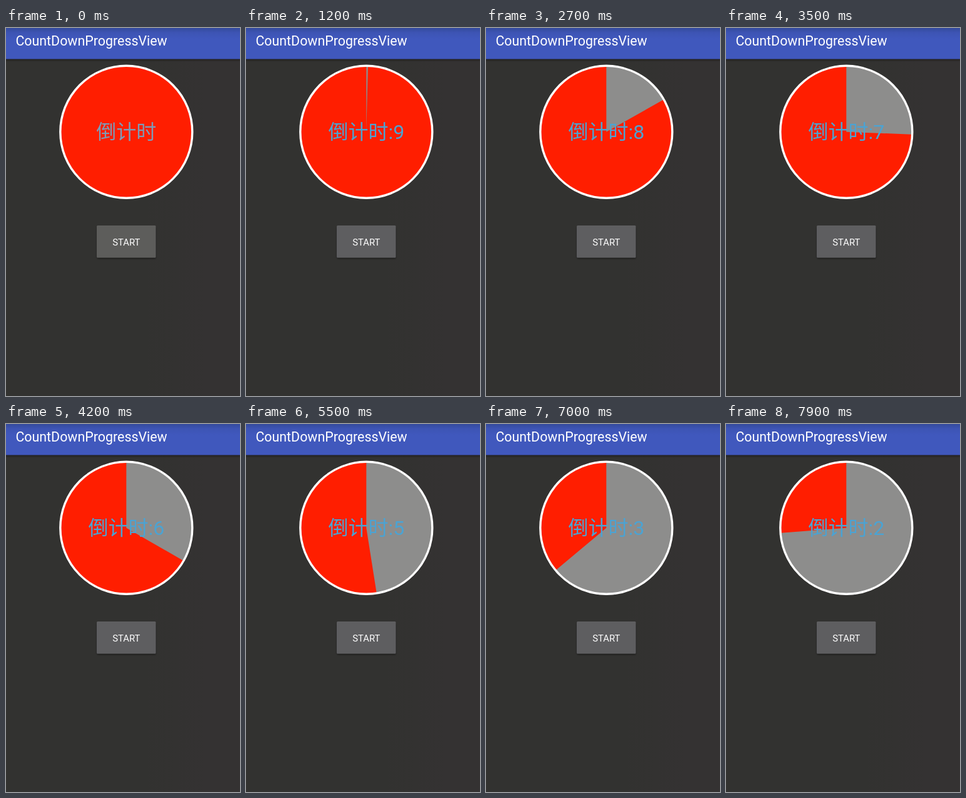
An HTML page for the animation above (8000 ms loop, 374x587 px).

```html
<!DOCTYPE html>
<html lang="zh-CN">
<head>
<meta charset="utf-8">
<title>CountDownProgressView</title>
<style>
  html, body {
    margin: 0;
    width: 100%;
    height: 100%;
    overflow: hidden;
    background: #323230;
  }
  svg { display: block; }
  text { font-family: Roboto, "Noto Sans CJK SC", "Noto Sans CJK", sans-serif; }
</style>
</head>
<body>
<svg width="374" height="587" viewBox="0 0 374 587">
  <defs>
    <linearGradient id="page">
      <stop offset=".6" stop-color="#323230"/>
      <stop offset=".85" stop-color="#343232"/>
    </linearGradient>
    <linearGradient id="bar" x2="0" y2="1">
      <stop offset="0" stop-color="#344a9c"/>
      <stop offset=".15" stop-color="#3d54b4"/>
      <stop offset=".35" stop-color="#4058bd"/>
      <stop offset="1" stop-color="#4058bd"/>
    </linearGradient>
    <linearGradient id="shade" x2="0" y2="1">
      <stop offset="0" stop-opacity=".4"/>
      <stop offset="1" stop-opacity="0"/>
    </linearGradient>
    <filter id="soft" x="-10%" y="-20%" width="120%" height="140%">
      <feGaussianBlur stdDeviation="1.3"/>
    </filter>
  </defs>

  <rect width="374" height="587" fill="url(#page)"/>
  <rect y="49" width="374" height="5" fill="url(#shade)"/>
  <rect width="374" height="49.5" fill="url(#bar)"/>
  <text x="15.4" y="28" font-size="21.4" fill="#fff">CountDownProgressView</text>

  <circle cx="192.3" cy="165.8" r="105.5" fill="#ff1e00"/>
  <path id="wedge" fill="#8d8d8c"/>
  <circle cx="192.3" cy="165.8" r="105.5" fill="none" stroke="#fff" stroke-width="3.4"/>
  <text id="label" x="192.3" y="177" font-size="32" text-anchor="middle"></text>

  <rect x="145.5" y="317" width="94" height="51" rx="2" opacity=".5" filter="url(#soft)"/>
  <rect id="button" x="145" y="315" width="94.5" height="51.5" rx="1.5"/>
  <text x="192.3" y="346.7" font-size="14.8" fill="#fff" text-anchor="middle">START</text>
</svg>
<script>
  const LOOP = 8000, TICK = 100, START = 1163;
  const SPEED = 0.03943; // degrees per ms
  const CX = 192.3, CY = 165.8, R = 104.5;
  const [wedge, label, button] = ['wedge', 'label', 'button'].map(id => document.getElementById(id));

  function sector(degrees) {
    const a = degrees * Math.PI / 180;
    const x = CX + R * Math.sin(a), y = CY - R * Math.cos(a);
    return `M${CX} ${CY}V${CY - R}A${R} ${R} 0 ${+(degrees > 180)} 1 ${x} ${y}Z`;
  }

  function render(time) {
    const angle = (Math.floor(time / TICK) * TICK - START) * SPEED;
    const running = angle > 0;
    wedge.setAttribute('d', running ? sector(angle) : '');
    label.textContent = running ? '倒计时:' + (9 - Math.floor(angle / 36)) : '倒计时';
    label.setAttribute('fill', running ? '#4ba3d3' : '#7d9bb8');
    button.setAttribute('fill', running ? '#5e5e60' : '#5d5d5b');
  }

  const origin = performance.now();
  function frame() {
    render((performance.now() - origin) % LOOP);
    requestAnimationFrame(frame);
  }
  frame();
</script>
</body>
</html>
```
